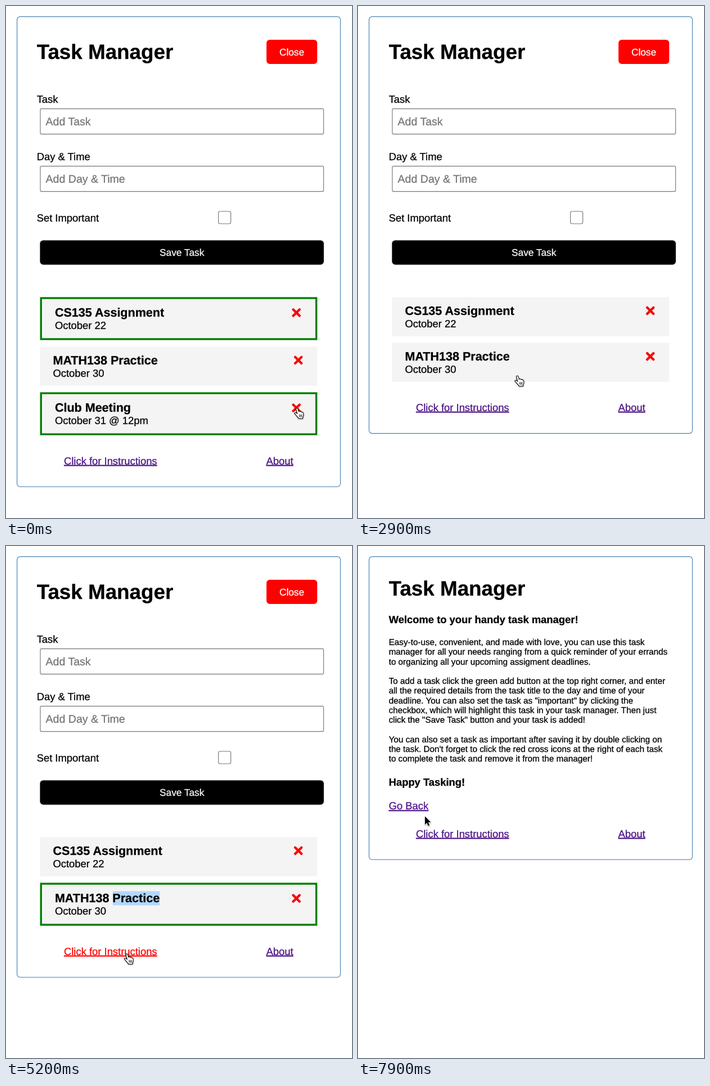
These frames come from a looping animation (615 by 910 pixels, 8 s). An HTML page:

```html
<!DOCTYPE html>
<html lang="en">
<head>
<meta charset="utf-8">
<title>Task Manager</title>
<style>
  html, body { margin: 0; width: 100%; height: 100%; overflow: hidden; background: #fff; }
  svg { display: block; width: 615px; height: 910px; }
  text {
    font-family: "Liberation Sans", Arial, sans-serif; font-size: 18.4px;
    text-rendering: geometricPrecision; white-space: pre;
    color: #000; fill: currentColor; stroke: currentColor; stroke-width: .28px;
  }
  .h1 { font-size: 36.8px; font-weight: bold; }
  .h3 { font-size: 21.53px; font-weight: bold; }
  .h4 { font-weight: bold; }
  .small { font-size: 15.27px; }
  .btn { font-size: 17.25px; color: #fff; text-anchor: middle; }
  .hint { font-size: 19.55px; color: #757575; }
  .link { color: #4b1285; text-decoration: underline; }
  .field { fill: #fff; stroke: #767676; stroke-width: 1.15; }
  #cursor { filter: drop-shadow(0 1px 1px rgba(0, 0, 0, .35)); }
  #status { filter: drop-shadow(0 0 4px rgba(0, 0, 0, .35)); }
</style>
</head>
<body>
<svg id="stage" viewBox="0 0 615 910">
  <rect width="615" height="910" fill="#fff"/>
  <rect id="frame" x="19.6" y="18.9" width="574.8" rx="5.5" fill="#fff" stroke="#4682b4" stroke-width="1.15"/>
  <text id="heading" class="h1" x="54.65">Task Manager</text>

  <g id="manager">
    <rect x="463" y="60" width="90.2" height="43" rx="5.75" fill="#f00"/>
    <text class="btn" x="508" y="87.5">Close</text>
    <text x="54.65" y="171.8">Task</text>
    <rect class="field" x="61" y="182.6" width="503.5" height="45" rx="2"/>
    <text class="hint" x="70.6" y="211.9">Add Task</text>
    <text x="54.65" y="273.8">Day &amp; Time</text>
    <rect class="field" x="61" y="284.6" width="503.5" height="45" rx="2"/>
    <text class="hint" x="70.6" y="313.9">Add Day &amp; Time</text>
    <text x="54.65" y="383">Set Important</text>
    <rect class="field" x="377.6" y="365" width="22" height="22" rx="2.9"/>
    <rect x="60.4" y="416.5" width="504.5" height="43.2" rx="5.75"/>
    <text class="btn" x="312.7" y="444.2">Save Task</text>
    <g id="cards"></g>
  </g>

  <g id="help">
    <text class="h4" x="54.65" y="137">Welcome to your handy task manager!</text>
    <g id="lines"></g>
    <text class="h4" x="54.65" y="425.6">Happy Tasking!</text>
    <text class="link" x="54.65" y="468.3">Go Back</text>
  </g>

  <g id="footer">
    <text id="guide" class="link" x="103">Click for Instructions</text>
    <text class="link" x="462.6">About</text>
  </g>

  <path id="status" d="M-4 894.5H50Q54 894.5 54 898.5V914H-4Z" fill="#dee2e5" stroke="#b8bcc0"/>

  <g id="cursor" stroke-linejoin="round">
    <path id="arrow" d="M0 0V14.8L3.4 11.6L5.7 17L8.2 15.9L5.9 10.6H10.5Z" stroke="#fff" stroke-width="1.6" paint-order="stroke"/>
    <g id="hand" transform="translate(-5 -1)" stroke="#000" stroke-width="1.1" stroke-linecap="round">
      <path d="M3.5 2.2C3.7.3 6.2.2 6.8 1.9L8.3 6.8C9 5.8 10.8 6 11.1 7.2C11.9 6.5 13.5 6.8 13.9 8.1C14.9 7.6 16.3 8.2 16.6 9.7C17.2 12 16.9 14.2 15.8 16.4L15.5 19.3H8.4C7.6 17 4.8 15.2 2.7 12.2L1.1 10.4C.4 9.2 1.8 8.1 3.2 8.7C4.2 9.1 4.9 9.9 5.8 10.7L3.6 3.3Z" fill="#fff"/>
      <path d="M9.3 12.2L9.8 16.3M11.5 12.2L11.8 16.3M13.7 12.2V16.3" fill="none" stroke-width=".9"/>
    </g>
  </g>
</svg>

<script>
const LOOP = 8000, STEP = 100;
const LEFT = 60.5, RIGHT = 553.3, LIST_TOP = 517.4;
const BODY = 69.5, GAP = 11.6, EDGE = 3.45;
const REMOVE = 300, UNMARK = 2000, SELECT = 3400, MARK = 4000, PRESS = 5200, OPEN = 5300;

const $ = id => document.getElementById(id);
const show = (el, on) => el.setAttribute("display", on ? "inline" : "none");

// Hot spot of the pointer: time, x, y
const path = [
  [300, 517, 715], [500, 510, 706], [800, 451, 627], [1100, 314.5, 558],
  [1200, 291, 546], [1300, 282.5, 542], [2000, 282.5, 542],
  [2300, 296, 676], [2800, 296, 676], [2900, 283, 657.5], [3000, 262, 634],
  [3100, 248.5, 621], [3900, 248.5, 621], [4000, 286.5, 667.5],
  [4300, 296, 690], [4500, 296, 690], [4800, 252, 711], [5100, 214.5, 725],
  [5600, 214.5, 725], [5800, 262, 720], [6000, 328, 710], [7100, 328, 710],
  [7300, 300, 685], [7700, 160, 528], [7900, 119, 480.5]
];

function pointAt(t) {
  const i = path.findIndex(p => p[0] >= t);
  if (i < 1) return path[i < 0 ? path.length - 1 : 0].slice(1);
  const [t0, x0, y0] = path[i - 1], [t1, x1, y1] = path[i];
  const k = (t - t0) / (t1 - t0);
  return [x0 + (x1 - x0) * k, y0 + (y1 - y0) * k];
}

const tasks = [
  { title: "CS135 Assignment", day: "October 22", marked: t => t < UNMARK, shown: () => true },
  { title: "MATH138 Practice", day: "October 30", marked: t => t >= MARK, shown: () => true },
  { title: "Club Meeting", day: "October 31 @ 12pm", marked: () => true, shown: t => t < REMOVE }
];

const bar = angle => `<rect x="-9.89" y="-2.12" width="19.78" height="4.24" rx="1.4" transform="rotate(${angle})"/>`;

$("cards").innerHTML = tasks.map(task => `<g>
  <rect class="edge" x="${LEFT}" width="${RIGHT - LEFT}" fill="#008000"/>
  <rect class="fill" fill="#f4f4f4"/>
  <g class="label">
    <rect class="mark" x="103" y="11.6" width="83.3" height="25" fill="#b3d7ff"/>
    <text class="h3" y="31.4">${task.title}</text>
    <text y="53.5">${task.day}</text>
  </g>
  <g class="cross" fill="#f00">${bar(45)}${bar(-45)}</g>
</g>`).join("");
tasks.forEach((task, i) => {
  task.el = $("cards").children[i];
  for (const name of ["edge", "fill", "label", "mark", "cross"]) {
    task[name] = task.el.querySelector("." + name);
  }
});

const copy = [
  "Easy-to-use, convenient, and made with love, you can use this task",
  "manager for all your needs ranging from a quick reminder of your errands",
  "to organizing all your upcoming assigment deadlines.",
  "",
  "To add a task click the green add button at the top right corner, and enter",
  "all the required details from the task title to the day and time of your",
  "deadline. You can also set the task as \"important\" by clicking the",
  "checkbox, which will highlight this task in your task manager. Then just",
  "click the \"Save Task\" button and your task is added!",
  "",
  "You can also set a task as important after saving it by double clicking on",
  "the task. Don't forget to click the red cross icons at the right of each task",
  "to complete the task and remove it from the manager!"
];
$("lines").innerHTML = copy.map((line, i) =>
  `<text class="small" x="54.65" y="${176 + i * 17.25}">${line}</text>`).join("");

// Lays out the list; returns its bottom and the hit boxes
function layCards(t) {
  const boxes = [];
  let y = LIST_TOP;
  tasks.forEach((task, i) => {
    const on = task.shown(t);
    show(task.el, on);
    if (!on) return;
    const edge = task.marked(t) ? EDGE : 0;
    const height = BODY + edge * 2;
    task.edge.setAttribute("y", y);
    task.edge.setAttribute("height", height);
    show(task.edge, edge > 0);
    const box = { x: LEFT + edge, y: y + edge, width: RIGHT - LEFT - edge * 2, height: BODY };
    for (const key in box) task.fill.setAttribute(key, box[key]);
    task.label.setAttribute("transform", `translate(${LEFT + edge + 23} ${y + edge})`);
    task.cross.setAttribute("transform", `translate(${519.6 - edge} ${y + edge + 24.2})`);
    show(task.mark, i === 1 && t >= SELECT);
    boxes.push([LEFT, y, RIGHT, y + height]);
    y += height + GAP;
  });
  return { bottom: y - GAP, boxes };
}

function statusAlpha(t) {
  if (t < OPEN) return 0;
  return t < 5700 ? 1 : Math.max(0, 1 - (t - 5600) / 300);
}

function draw(t) {
  const help = t >= OPEN;
  show($("manager"), !help);
  show($("help"), help);
  $("heading").setAttribute("y", help ? 87.8 : 93.8);

  const list = layCards(t);
  const bottom = help ? 557.5 : list.bottom + 91.6;
  const base = bottom - 39.7;
  $("frame").setAttribute("height", bottom - 18.9);
  for (const link of $("footer").children) link.setAttribute("y", base);
  $("guide").style.color = t >= PRESS && !help ? "#f00" : "";

  const hits = help ? [[55, 452, 126, 473]] : list.boxes;
  hits.push([103, base - 16, 269, base + 5], [462, base - 16, 511, base + 5]);
  const [x, y] = pointAt(t);
  const over = hits.some(([l, top, r, b]) => x >= l && x <= r && y >= top && y <= b);
  show($("hand"), over);
  show($("arrow"), !over);
  $("cursor").setAttribute("transform", `translate(${x} ${y})`);

  const alpha = statusAlpha(t);
  $("status").setAttribute("opacity", alpha);
  show($("status"), alpha > 0);
}

function tick() {
  const t = performance.now() % LOOP;
  draw(Math.floor(t / STEP) * STEP);
  requestAnimationFrame(tick);
}
tick();
</script>
</body>
</html>
```
